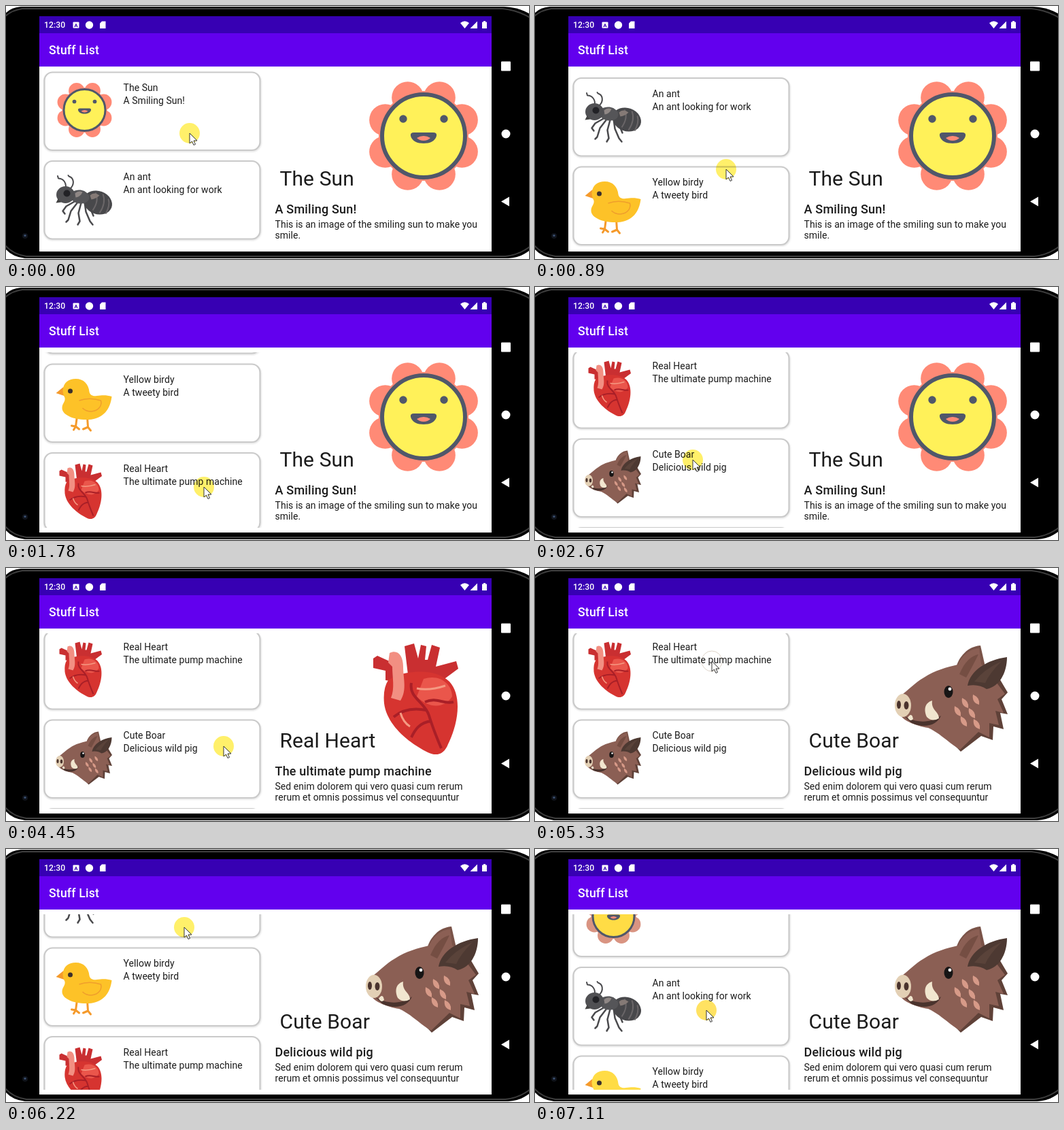
Recreate the animation shown at these times as an HTML page. Size 769 px wide and 372 px high, loop 8000 ms.

```html
<!DOCTYPE html>
<html lang="en">
<head>
<meta charset="utf-8">
<title>Stuff List</title>
<style>
  html, body { margin: 0; width: 100%; height: 100%; overflow: hidden; background: #fff; }
  svg { display: block; --sun: #fff159; --petal: #ff8a76; --bird: #fdc228; --halo: #fff06a; }
  svg.warm { --sun: #ffdc45; --petal: #d99482; --bird: #ffdc45; --halo: #ffe262; }
  text { font-family: Roboto, sans-serif; font-size: 14px; letter-spacing: .045px; fill: #1b1b1b; white-space: pre; }
  .bold { font-weight: 500; }
  .white { fill: #fff; }
</style>
</head>
<body>
<svg id="stage" width="769" height="372" viewBox="0 0 769 372">
  <defs>
    <clipPath id="listClip"><rect x="49" y="96" width="332" height="258"/></clipPath>
    <filter id="soft" x="-5%" y="-10%" width="110%" height="125%"><feGaussianBlur stdDeviation="1.2"/></filter>

    <g id="sun">
      <g id="petals" fill="var(--petal)"><circle cx="80" cy="80" r="66"/></g>
      <circle cx="80" cy="80" r="61" fill="var(--sun)" stroke="#50576a" stroke-width="6"/>
      <g fill="#50576a">
        <circle cx="50" cy="55" r="5.7"/>
        <circle cx="110" cy="55" r="5.7"/>
        <path d="M66 75H94Q100 75 99 80C97 88 89 91 80 91S63 88 61 80Q60 75 66 75Z"/>
      </g>
      <path d="M70 83Q80 77 90 83Q86 87 80 87T70 83Z" fill="#ff8a76"/>
    </g>

    <g id="ant">
      <g fill="none" stroke="#4a4a4d" stroke-width="5" stroke-linecap="round" stroke-linejoin="round">
        <path d="M24 50C28 34 18 20 3 20L1 13M38 50C52 36 48 18 34 14L32 11" stroke-width="4"/>
        <path d="M54 86L26 102L16 116L22 124M60 90L40 116L32 142L26 148M70 92L62 122L66 146L60 156"/>
        <path d="M80 88L84 118L96 146L104 156M88 86L106 130"/>
      </g>
      <ellipse cx="119" cy="91" rx="43" ry="34" transform="rotate(20 119 91)" fill="#48484b"/>
      <path d="M112 62Q124 84 104 114M134 66Q144 92 124 122M150 80Q156 100 142 124" fill="none" stroke="#6a6668" stroke-width="4"/>
      <ellipse cx="66" cy="74" rx="28" ry="20" transform="rotate(8 66 74)" fill="#555558"/>
      <path d="M52 64Q62 54 74 60Q68 74 54 76Z" fill="#8f8785"/>
      <ellipse cx="24" cy="68" rx="27" ry="25" fill="#505053"/>
      <path d="M2 80L-4 92L12 90Z" fill="#444"/>
      <circle cx="28" cy="64" r="10" fill="#222226"/>
      <path d="M96 70Q108 58 124 70Q114 80 100 82Z" fill="#857a76"/>
    </g>

    <g id="bird">
      <path d="M58 122L54 152M54 152L42 150M54 152L48 162M54 152L64 160M88 124L90 154M90 154L76 160M90 154L98 164" fill="none" stroke="#f59a2b" stroke-width="6" stroke-linecap="round"/>
      <path d="M18 36L-4 54L20 62Z" fill="#f59a2b"/>
      <path d="M16 46C18 22 34 12 54 12C78 12 92 28 94 50C96 60 104 64 116 62C134 60 146 60 160 64C156 100 136 130 92 132C48 134 14 118 14 98C14 84 24 80 22 68C18 60 16 54 16 46Z" fill="var(--bird)"/>
      <path d="M64 76C80 70 104 68 128 76C132 90 122 106 100 108C86 108 78 102 74 98" fill="none" stroke="#ef9e2c" stroke-width="3"/>
      <circle cx="38" cy="48" r="7" fill="#3c302c"/>
    </g>

    <g id="heart">
      <path d="M6 22L12 18L34 28L38 56L24 54L24 40L6 36ZM52 4L66 0L72 22L76 2L84 4L82 24L86 24L92 2L104 6L98 34L128 26L131 37L108 54L58 54Z" fill="#c92f31"/>
      <path d="M28 54C46 40 96 34 118 56C138 78 130 120 116 148C110 164 98 166 86 160C58 146 26 120 22 88Q20 66 28 54Z" fill="#d63430"/>
      <path d="M80 52C104 44 122 60 122 78C110 96 88 96 70 78Z" fill="#ea564b"/>
      <path d="M30 14C42 8 50 18 50 34C50 52 56 68 46 84L32 80C38 66 34 50 34 34L28 28Z" fill="#f28f82"/>
      <path d="M62 58C58 80 82 86 88 106S100 140 106 154M84 98C64 94 48 98 36 108M92 114C72 116 66 130 62 138M82 86C100 78 108 90 124 86" fill="none" stroke="#a91f27" stroke-width="4"/>
      <path d="M70 66Q88 70 112 62M46 102Q50 116 60 122" fill="none" stroke="#f59a83" stroke-width="3"/>
    </g>

    <g id="boar">
      <path d="M84 40C88 18 104 4 121 3L128 34L110 66Z" fill="#7a5348"/>
      <path d="M96 34L148 50L161 72L152 82L161 104L150 102L155 126L140 122L139 142L122 136L92 159L64 130Z" fill="#5f4138"/>
      <path d="M2 78C16 68 24 58 38 50C54 39 72 35 88 31C96 14 108 8 119 7L122 30L142 54L157 74L146 82L155 102L143 99L148 120L134 117L134 138L118 130L91 156C74 146 62 132 44 124C26 121 8 114 2 104Z" fill="#8b5f54"/>
      <path d="M90 45C98 26 108 18 118 16Q108 36 100 50Z" fill="#754e43"/>
      <path d="M102 62C106 40 130 24 160 20C160 44 148 64 130 67C122 62 114 60 102 62Z" fill="#4d3932"/>
      <path d="M112 56Q126 38 152 26Q134 44 128 58Z" fill="#5a433a"/>
      <path d="M8 106C24 117 48 118 63 106C57 121 38 125 20 117Z" fill="#4a332d"/>
      <path d="M42 108C36 94 42 86 50 84C48 98 60 100 60 110Q50 116 42 108Z" fill="#f1e6cf"/>
      <path d="M14 109Q20 100 22 111Q18 116 14 109Z" fill="#f1e6cf"/>
      <ellipse cx="7" cy="91" rx="12" ry="17" fill="#e3d0b5"/>
      <g fill="#4a332d">
        <ellipse cx="1" cy="90" rx="3" ry="6"/>
        <ellipse cx="12" cy="91" rx="3.5" ry="6"/>
      </g>
      <ellipse cx="74" cy="71" rx="6.5" ry="9" fill="#171515"/>
      <circle cx="76" cy="67" r="2.4" fill="#fff"/>
      <path id="spots" fill="#d79a88"/>
    </g>
  </defs>

  <!-- device -->
  <rect width="769" height="372" fill="#fff"/>
  <path d="M0 10Q8 2 22 1H732Q754 2 769 11V360Q756 370 738 371H28Q10 369 0 358Z"/>
  <path d="M-1 15Q9 6 24 4H730Q752 6 770 17M-1 352Q10 365 30 368H734Q754 366 770 354" fill="none" stroke="#3c3c3c" stroke-width="2"/>
  <circle cx="28" cy="338" r="4" fill="#10141c"/>
  <circle cx="28" cy="337.5" r="1.6" fill="#3d5274"/>
  <g fill="#fff">
    <rect x="728" y="81.500" width="14" height="14" rx="1"/>
    <circle cx="735" cy="188" r="6.5"/>
    <path d="M728 287.500L740 280.500V294.500Z"/>
  </g>

  <!-- screen -->
  <rect x="49" y="15" width="665" height="346" fill="#fff"/>
  <rect x="49" y="15" width="665" height="25" fill="#3700b3"/>
  <rect x="49" y="40" width="665" height="49" fill="#6200ee"/>
  <text class="bold white" x="56" y="32" style="font-size:12.200px">12:30</text>
  <g fill="#fff">
    <rect x="98.500" y="23.500" width="9" height="9" rx="1"/>
    <circle cx="122.500" cy="28" r="5.700"/>
    <path d="M141 22.500H146.500V33H138V25.500Z"/>
    <path d="M668 25Q674.500 19.500 681 25L674.500 33Z"/>
    <path d="M693 22.500V33H682.500Z"/>
    <path d="M700 23.500H702V22H705V23.500H707V33H700Z"/>
  </g>
  <text x="103" y="31" text-anchor="middle" style="font-size:8px;font-weight:700;fill:#3700b3">A</text>
  <text class="bold white" x="63" y="71" style="font-size:17.600px;letter-spacing:.2px">Stuff List</text>

  <g clip-path="url(#listClip)"><g id="list"></g></g>

  <use id="photo" x="534" y="111"/>
  <text id="title" x="402.500" y="264" style="font-size:30px;letter-spacing:.1px"></text>
  <text id="sub" class="bold" x="395.500" y="305" style="font-size:18px;letter-spacing:.2px"></text>
  <text id="line1" x="395.500" y="325.500"></text>
  <text id="line2" x="395.500" y="342"></text>

  <g id="pointer">
    <circle id="halo" r="15" style="mix-blend-mode:multiply"/>
    <path d="M0 0V15L3.500 12L6 17.500L8.500 16.300L6 11H11Z" fill="#fff" stroke="#333" stroke-width="1"/>
  </g>
</svg>

<script>
const $ = id => document.getElementById(id);
const LOOP = 8000, HOLD = 889, PITCH = 130.5;
const lorem = ["Sed enim dolorem qui vero quasi cum rerum", "rerum et omnis possimus vel consequuntur"];
const items = {
  sun: ["The Sun", "A Smiling Sun!", "This is an image of the smiling sun to make you", "smile."],
  ant: ["An ant", "An ant looking for work", ...lorem],
  bird: ["Yellow birdy", "A tweety bird", ...lorem],
  heart: ["Real Heart", "The ultimate pump machine", ...lorem],
  boar: ["Cute Boar", "Delicious wild pig", ...lorem]
};

const steps = [
  { x: 270, y: 187, scroll: 0, pick: "sun", halo: "press" },
  { x: 281, y: 240, scroll: 122, pick: "sun", halo: "press" },
  { x: 291, y: 294, scroll: 245, pick: "sun", halo: "press" },
  { x: 232, y: 254, scroll: 396, pick: "sun", halo: "press" },
  { x: 235, y: 145, scroll: 396, pick: "boar", halo: "none" },
  { x: 320, y: 262, scroll: 396, pick: "heart", halo: "press" },
  { x: 260, y: 137, scroll: 396, pick: "boar", halo: "ring" },
  { x: 262, y: 115, scroll: 213, pick: "boar", halo: "press" },
  { x: 252, y: 237, scroll: 54, pick: "boar", halo: "press", warm: true }
];
const halos = {
  press: ["var(--halo)", "none"],
  ring: ["none", "#ddd3c8"],
  none: ["none", "none"]
};

function petal(i) {
  const a = (i + .5) * Math.PI / 4;
  return `<circle cx="${80 + 61 * Math.cos(a)}" cy="${80 + 61 * Math.sin(a)}" r="23.5"/>`;
}

function spotPath() {
  return [[98, 88], [114, 83], [87, 100], [108, 103], [96, 115], [115, 119]]
    .map(([x, y]) => `M${x - 4} ${y - 8}Q${x + 7} ${y - 3} ${x + 5} ${y + 7}Q${x - 6} ${y + 4} ${x - 4} ${y - 8}Z`)
    .join("");
}

function card(key, i) {
  const y = 97.5 + i * PITCH;
  const frame = `<rect x="56.500" y="${y + 1.5}" width="317.500" height="114" rx="12" fill="none" stroke="#e2e2e2" stroke-width="3" filter="url(#soft)"/>
    <rect x="56.500" y="${y}" width="317" height="114.500" rx="12" fill="#fff" stroke="#cacaca" stroke-width="2.200"/>`;
  if (!key) return frame;
  const [name, note] = items[key];
  return `${frame}<use href="#${key}" transform="translate(75.500 ${y + 15.5}) scale(.5)"/>
    <text x="172.500" y="${y + 27.5}">${name}</text>
    <text x="172.500" y="${y + 46.5}">${note}</text>`;
}

function draw(time) {
  const n = Math.min(steps.length - 1, Math.floor((time % LOOP + 5) / HOLD));
  const s = steps[n];
  $("stage").classList.toggle("warm", !!s.warm);
  $("list").setAttribute("transform", `translate(0 ${-s.scroll})`);
  $("photo").setAttribute("href", "#" + s.pick);
  ["title", "sub", "line1", "line2"].forEach((id, i) => { $(id).textContent = items[s.pick][i]; });
  $("pointer").setAttribute("transform", `translate(${s.x} ${s.y})`);
  const [fill, stroke] = halos[s.halo];
  $("halo").setAttribute("fill", fill);
  $("halo").setAttribute("stroke", stroke);
}

$("petals").innerHTML += [0, 1, 2, 3, 4, 5, 6, 7].map(petal).join("");
$("spots").setAttribute("d", spotPath());
$("list").innerHTML = [...Object.keys(items), null].map(card).join("");

const start = performance.now();
function tick(now) {
  draw(Math.max(0, now - start));
  requestAnimationFrame(tick);
}
draw(0);
requestAnimationFrame(tick);
</script>
</body>
</html>
```
